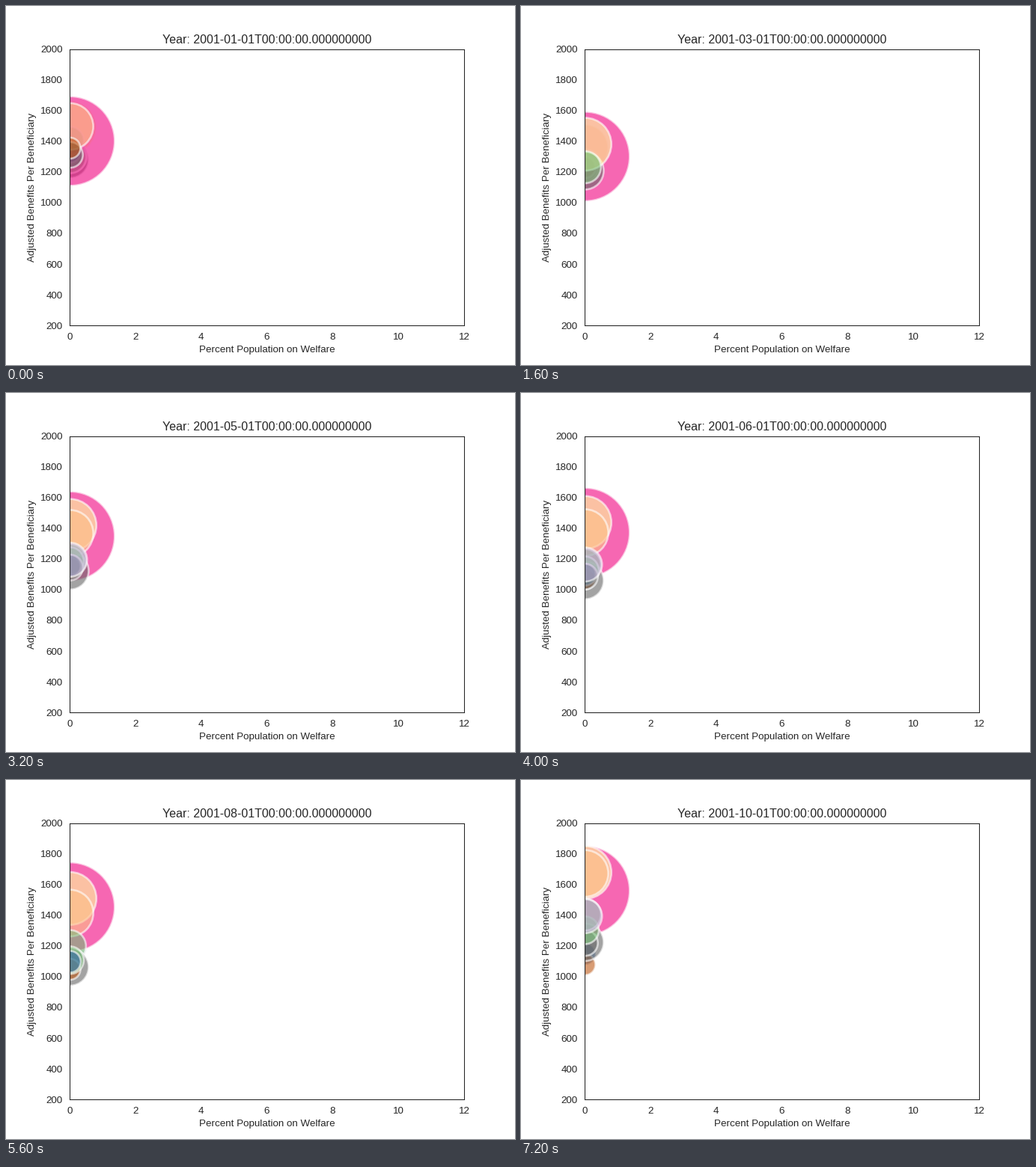
These frames come from a looping animation (680 by 480 pixels, 8000 ms). A matplotlib script:

```python
import matplotlib.pyplot as plt
import numpy as np
from matplotlib.animation import FuncAnimation

DPI = 96
INK = "0.15"

plt.rcParams.update({
    "font.family": "Liberation Sans",
    "font.size": 10,
    "axes.titlesize": 12,
    "axes.edgecolor": INK,
    "axes.linewidth": 0.8,
    "axes.labelcolor": INK,
    "text.color": INK,
    "xtick.color": INK,
    "ytick.color": INK,
})

# key: (radius in px, gap to the largest region in January, August, October)
REGIONS = {
    "g": (21.4, (-105, -254, -156)),
    "n": (18.5, (3, -346, -258)),
    "v": (22.8, (-95, -254, -166)),
    "o": (31.2, (95, -39, 112)),
    "y": (35.3, (89, 56, 119)),
    "b": (14.5, (-70, -356, -414)),
    "p": (59.8, (0, 0, 0)),
    "r": (14.0, (-46, -405, -482)),
    "d": (25.0, (-119, -390, -336)),
    "h": (17.2, (-90, -366, -341)),
}
COLOURS = dict(zip(REGIONS, plt.cm.Accent(np.linspace(0, 1, len(REGIONS)))))

# drawing order per month, bottom to top
STACKS = (["ydvgnbpohr"] + ["ovnhbrpdyg"] * 2 + ["yogvnbdhrp"]
          + ["pdyogrnbhv"] * 2 + ["vpyoghdrnb"] * 2
          + ["yogvnrbdph", "pyobrdhngv"])

TURNS = (0, 1, 5, 7, 8, 9)                      # months where the trend turns
LEVEL = (1401, 1277, 1372, 1453, 1284, 1560)    # benefit of the largest region
SPREAD = (1, 0.3, 1, 1, 0.75, 1)                # how far the lower ones lag

fig, ax = plt.subplots(figsize=(680 / DPI, 480 / DPI), dpi=DPI, facecolor="white")
fig.subplots_adjust(left=0.125, right=0.9, bottom=0.11, top=0.88)
ax.set(xlim=(0, 12), ylim=(200, 2000),
       xlabel="Percent Population on Welfare",
       ylabel="Adjusted Benefits Per Beneficiary")
ax.set_xticks(range(0, 13, 2))
ax.set_yticks(range(200, 2001, 200))
ax.tick_params(length=0, pad=7)
title = ax.set_title("")

bubbles = ax.scatter(np.zeros(len(REGIONS)), np.zeros(len(REGIONS)),
                     edgecolors="white", linewidths=2, alpha=0.6)


def benefit(key, month):
    gap = np.interp(month, (0, 7, 9), REGIONS[key][1])
    if gap < 0:
        gap *= np.interp(month, TURNS, SPREAD)
    return np.interp(month, TURNS, LEVEL) + gap


def draw(month):
    stack = STACKS[month]
    bubbles.set_offsets([(0.01, benefit(key, month)) for key in stack])
    bubbles.set_sizes([(2 * REGIONS[key][0] * 72 / DPI) ** 2 for key in stack], DPI)
    bubbles.set_facecolor([COLOURS[key] for key in stack])
    title.set_text(f"Year: 2001-{month + 1:02d}-01T00:00:00.000000000")
    return bubbles, title


anim = FuncAnimation(fig, draw, frames=len(STACKS), interval=800, repeat=True)
plt.show()
```
